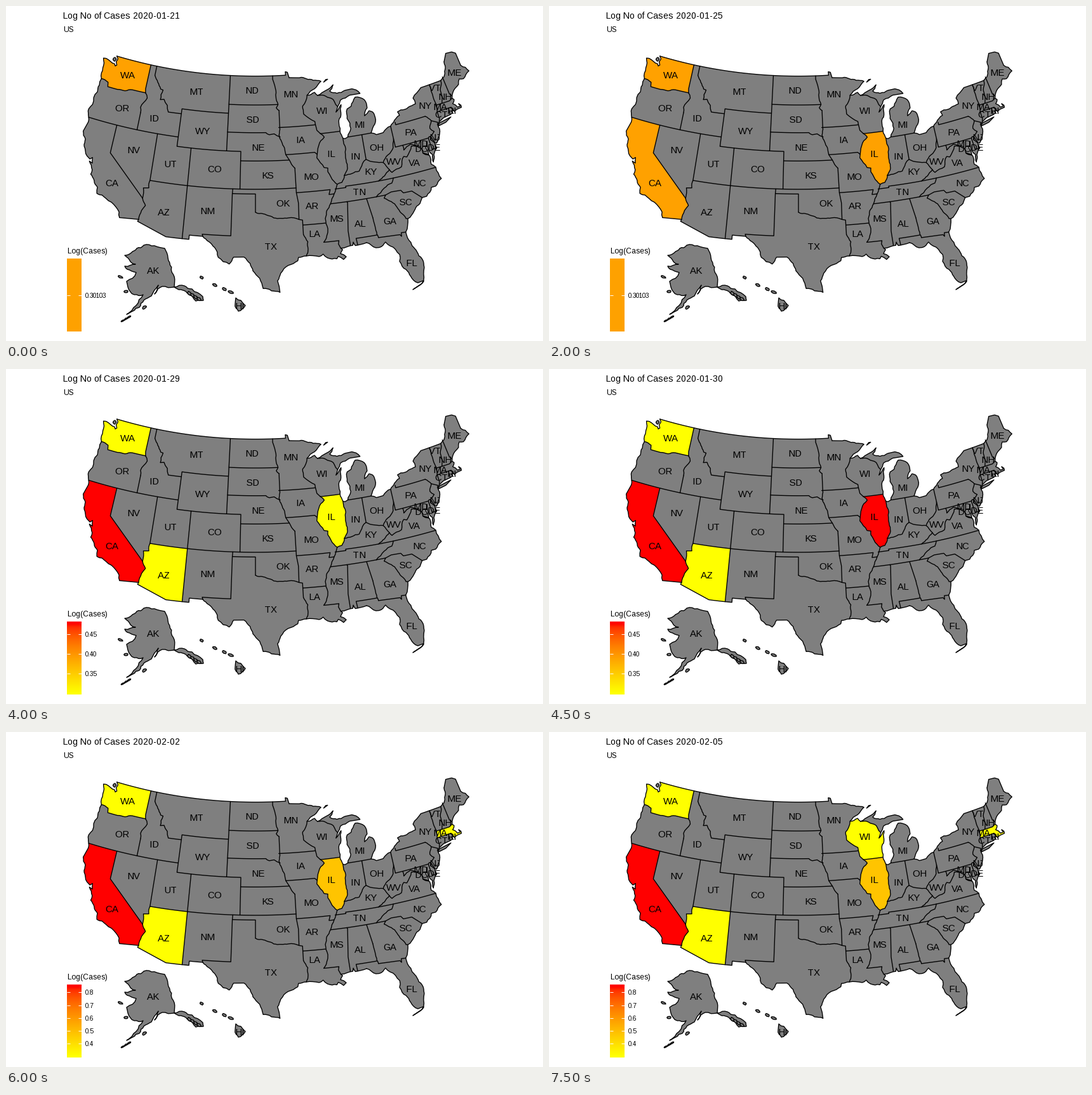
A matplotlib script for the animation above (8000 ms loop, 846 by 528 pixels).

```python
import math

import matplotlib.pyplot as plt
import numpy as np
from matplotlib.animation import FuncAnimation

W, H, DPI = 846, 528, 96
PX = 72 / DPI
DAYS, STEP_MS = 16, 500
GREY = "#7f7f7f"
plt.rcParams.update({"font.family": "Liberation Sans", "text.hinting_factor": 1})
rng = np.random.default_rng(4)

fig = plt.figure(figsize=(W / DPI, H / DPI), dpi=DPI, facecolor="white")
ax = fig.add_axes([0, 0, 1, 1])
ax.axis("off")


# ---- map geometry: key points in degrees west / north ----
def project(*c):
    """Lambert azimuthal equal-area around 45N 100W; parallels become curves."""
    p = np.array(c, float).reshape(-1, 2)
    dense = [p[:1]]
    for a, b in zip(p, p[1:]):
        n = 1 + int(2 * abs(b[0] - a[0])) if abs(b[1] - a[1]) < 0.12 else 1
        dense.append(a + (b - a) * np.arange(1, n + 1)[:, None] / n)
    lon, lat = np.radians(np.vstack(dense) * [-1, 1] + [100, 0]).T
    s = math.sqrt(0.5)
    u, v, w = np.cos(lat) * np.sin(lon), np.sin(lat), np.cos(lat) * np.cos(lon)
    k = 852 * np.sqrt(2 / (1 + s * (v + w)))
    return np.column_stack([393 + k * u, 170 - k * s * (v - w)])


def roughen(p, amount):
    """Midpoint displacement of every piece longer than a few pixels."""
    out = [p[0]]
    for a, b in zip(p, p[1:]):
        d = b - a
        if np.hypot(*d) > 5.5:
            mid = (a + b) / 2 + np.array([-d[1], d[0]]) * rng.uniform(-amount, amount)
            out.extend(roughen(np.array([a, mid, b]), amount)[1:])
        else:
            out.append(b)
    return np.array(out)


shore, borders, islands = [], [], []


def coast(*c):
    shore.append(roughen(project(*c), 0.11))
    return shore[-1]


def frontier(*c):
    shore.append(project(*c))


def river(*c):
    borders.append(roughen(project(*c), 0.09))
    return borders[-1]


def survey(*c):
    borders.append(project(*c))
    return borders[-1]


def ring(first, *parts):
    """Join arcs end to end, turning each one as needed."""
    for p in parts:
        turned = np.hypot(*(first[-1] - p[0])) > np.hypot(*(first[-1] - p[-1]))
        first = np.vstack([first, p[::-1] if turned else p])
    return first


def island(*c):
    islands.append(project(*c))


def inset(*c):
    p = np.array(c, float).reshape(-1, 2)
    islands.append(roughen(np.vstack([p, p[:1]]), 0.14))


def islet(x, y, rx, ry, tilt=0):
    a = np.linspace(0, 2 * np.pi, 9)[:-1]
    r = rng.uniform(0.75, 1.15, 8)
    u, v, t = rx * r * np.cos(a), ry * r * np.sin(a), math.radians(tilt)
    islands.append(np.column_stack([x + u * math.cos(t) - v * math.sin(t),
                                    y + u * math.sin(t) + v * math.cos(t)]))


# outer edge, counter-clockwise from the north-west
wa_coast = coast(122.76, 49, 122.45, 48.75, 122.6, 48.4, 122.35, 48.1, 122.55, 47.95,
                 122.75, 48.15, 123.15, 48.17, 124.73, 48.38, 124.35, 47.4, 124.05, 46.27)
coast(124.05, 46.27, 124.05, 44.8, 124.2, 43.4, 124.55, 42.84, 124.21, 42)
ca_coast = coast(124.21, 42, 124.07, 41.5, 124.4, 40.44, 123.8, 39.7, 123.7, 38.95, 122.98, 38.05,
                 122.5, 37.82, 122.2, 38.05, 122.05, 37.47, 122.5, 37.6, 121.85, 36.8,
                 121.9, 36.3, 120.65, 35.15, 120.55, 34.5, 119.25, 34.2, 118.5, 33.95,
                 117.3, 33.1, 117.12, 32.53)
frontier(117.12, 32.53, 114.72, 32.72, 114.81, 32.5, 111.07, 31.33, 108.21, 31.33,
         108.21, 31.78, 106.53, 31.78)
coast(106.53, 31.78, 105, 30.68, 104.5, 29.65, 103.15, 28.98, 102.65, 29.73, 101.4, 29.77,
      100.65, 29.1, 100.3, 28.3, 99.5, 27.5, 99.1, 26.4, 97.15, 25.96)
coast(97.15, 25.96, 97.4, 27.2, 97, 28, 94.9, 29.25, 94.8, 29.6, 93.85, 29.7, 92.3, 29.53,
      91.8, 29.75, 91.3, 29.3, 90.2, 29.1, 90, 29.35, 89.4, 28.95, 89.05, 29.2,
      89.7, 29.6, 89.4, 30, 89.6, 30.18, 88.1, 30.32, 88, 30.65, 87.8, 30.25, 86.4, 30.38)
coast(86.4, 30.38, 85.35, 29.68, 84.95, 29.65, 84.1, 30.1, 83.05, 29.13, 82.65, 28.5, 82.8, 27.8,
      82.2, 26.8, 81.8, 26, 81.1, 25.15, 80.4, 25.25, 80.05, 26.6, 80.55, 28.4, 81.3, 29.9,
      81.45, 30.71)
coast(81.45, 30.71, 80.87, 32.05, 79.9, 32.7, 79.2, 33.2, 78.55, 33.86, 77.95, 33.87, 77.1, 34.65,
      76.5, 34.65, 75.55, 35.25, 75.87, 36.55, 76.35, 37, 76.25, 37.9, 77.05, 38.38,
      76.32, 38.05, 76.5, 38.8, 76.1, 39.45, 76.25, 38.7, 75.85, 37.95, 76, 37.15,
      75.05, 38.45, 75.42, 39.8)
coast(75.42, 39.8, 75.55, 39.5, 74.9, 38.95, 74.1, 39.8, 74, 40.75, 73.65, 41,
      72.9, 41.25, 71.86, 41.32, 71.45, 41.4, 71.4, 41.7, 71.12, 41.5)
ma_coast = coast(71.12, 41.5, 70.65, 41.6, 70, 41.62, 69.95, 41.85, 70.2, 42.08, 70.05, 41.8,
                 70.5, 41.78, 71, 42.3, 70.6, 42.65, 70.82, 42.87)
coast(70.82, 42.87, 70.4, 43.4, 69.2, 43.95, 68.8, 44.45, 68.2, 44.3, 66.97, 44.82, 67.8, 45.7)
frontier(67.8, 45.7, 67.8, 47.07, 68.3, 47.35, 69.25, 47.45, 70, 46.7)
coast(70, 46.7, 70.3, 45.9, 70.85, 45.25, 71.5, 45.01)
frontier(71.5, 45.01, 74.7, 45)
coast(74.7, 45, 76.3, 44.2, 76.2, 43.55, 78.5, 43.37, 79.05, 43.26, 78.9, 42.85, 80.52, 41.98,
      81.75, 41.5, 82.75, 41.45, 83.45, 41.73)
coast(83.45, 41.73, 83.1, 42.2, 82.42, 43, 82.6, 43.85, 83.1, 44.07, 83.9, 43.65, 83.3, 44.4,
      83.45, 45.3, 84.75, 45.77, 85.6, 44.9, 86.25, 44.7, 86.5, 43.7, 86.2, 42.6, 86.82, 41.76,
      87.25, 41.63, 87.53, 41.71)
il_lake = coast(87.53, 41.71, 87.8, 42.49)
wi_lake = coast(87.8, 42.49, 87.75, 43.6, 87.05, 45.25, 87.98, 44.55, 87.6, 45.1)
coast(87.6, 45.1, 87, 45.75, 85.5, 46.08, 83.9, 46.05, 84.4, 46.5, 85, 46.7, 86.1, 46.67,
      87.4, 46.5, 88.45, 46.85, 87.8, 47.45, 89, 46.98, 90.42, 46.57)
wi_north = coast(90.42, 46.57, 90.8, 46.92, 92.01, 46.7)
coast(92.01, 46.7, 89.6, 48, 90.8, 48.2, 92.95, 48.62, 94.6, 48.72)
frontier(94.6, 48.72, 94.82, 49.3, 95.15, 49.37, 95.15, 49, 122.76, 49)

# western states: mostly parallels and meridians
for lat, west, east in [(42, 124.21, 111.05), (37, 114.04, 94.62), (45.94, 104.05, 96.56),
                        (40, 102.05, 95.31), (43.5, 96.6, 91.22), (33.02, 94.04, 91.17)]:
    survey(west, lat, east, lat)
for lon, south, north in [(117.03, 42, 43.85), (114.04, 37, 42), (104.05, 41, 49),
                          (109.05, 31.33, 41), (96.45, 43.5, 45.3)]:
    survey(lon, south, lon, north)
survey(104.05, 45, 111.05, 45, 111.05, 41, 102.05, 41, 102.05, 37)
survey(103, 37, 103.04, 36.5, 103.06, 32, 106.62, 32, 106.53, 31.78)
survey(103.04, 36.5, 100, 36.5, 100, 34.56)
ca_nv = survey(114.63, 35, 120, 39, 120, 42)
wa_or = river(124.05, 46.27, 122.9, 46.1, 122.75, 45.65, 121.2, 45.65, 119, 46, 116.92, 46)
wa_id = survey(116.92, 46, 117.04, 46.42, 117.03, 49)
river(116.92, 46, 116.5, 45.5, 117.2, 44.4, 117.03, 43.85)
river(116.05, 48, 114.75, 46.7, 114.35, 46.65, 114.5, 45.6, 113.95, 45.7, 113, 44.45, 111.05, 44.48)
survey(116.05, 49, 116.05, 48)
colorado = river(114.63, 35, 114.13, 34.3, 114.53, 33.7, 114.72, 32.72)
nv_az = river(114.63, 35, 114.74, 36.1, 114.04, 36.2, 114.04, 37)

# plains and the Mississippi
river(100, 34.56, 98.1, 34.13, 97.2, 33.85, 95.8, 33.87, 94.48, 33.64)
survey(104.05, 43, 98.5, 43)
river(98.5, 43, 98, 42.77, 97.3, 42.85, 96.45, 42.49)
river(97.23, 49, 96.85, 47.6, 96.56, 45.94, 96.85, 45.6, 96.45, 45.3)
river(96.45, 43.5, 96.6, 42.7, 95.9, 41.3, 95.77, 40.59, 95.31, 40, 94.62, 39.11)
survey(94.62, 39.11, 94.62, 36.5, 94.43, 35.4, 94.48, 33.64, 94.04, 33.55, 94.04, 32)
river(94.04, 32, 93.55, 31.2, 93.85, 29.7)
survey(94.62, 36.5, 90.15, 36.5, 90.37, 36, 89.7, 36)
survey(95.77, 40.59, 91.73, 40.61, 91.42, 40.38)
mn_wi = river(92.01, 46.7, 92.3, 46.1, 92.85, 45.6, 92.8, 44.75, 91.25, 43.85, 91.22, 43.5)
ia_wi = river(91.22, 43.5, 91.1, 42.9, 90.64, 42.51)
il_west = river(90.64, 42.51, 90.15, 42.1, 91.05, 41.3, 91.5, 40, 90.65, 38.9, 90.15, 38.8,
                90.2, 38.4, 89.5, 37.3, 89.15, 36.98)
river(89.15, 36.98, 89.7, 36, 90.3, 35, 91.15, 33.5, 90.95, 32.4, 91.6, 31)
survey(91.6, 31, 89.73, 31, 89.83, 30.65, 89.6, 30.18)

# lakes and Ohio valley
il_wi = survey(90.64, 42.51, 87.8, 42.49)
wi_up = river(90.42, 46.57, 88.1, 45.9, 87.85, 45.35, 87.6, 45.1)
il_in = river(87.53, 41.71, 87.53, 39.35, 87.5, 38.5, 88.05, 37.8)
il_ky = river(88.05, 37.8, 88.5, 37.1, 89.15, 36.98)
river(88.05, 37.8, 86, 38, 85.4, 38.73, 84.82, 39.1, 83.7, 38.65, 82.6, 38.42, 81.75, 39.1,
      80.85, 39.7, 80.52, 40.64)
survey(84.82, 39.1, 84.8, 41.72)
survey(86.82, 41.76, 83.45, 41.73)
survey(80.52, 41.98, 80.52, 39.72)
survey(88.2, 35, 88.1, 34.9, 88.47, 31.9, 88.4, 30.37)

# south-east
river(81.97, 37.54, 82.6, 38.42)
river(77.72, 39.32, 78.35, 39.4, 79.3, 38.42, 79.7, 38.55, 80.3, 37.55, 81.7, 37.2, 81.97, 37.54,
      83.68, 36.6)
survey(89.5, 36.5, 88.07, 36.5, 88.07, 36.65, 83.68, 36.6, 75.87, 36.55)
river(81.68, 36.59, 82, 36.1, 83.1, 35.75, 84.32, 34.99)
survey(90.3, 35, 83.1, 35, 82.3, 35.2, 81.05, 35.15, 80.78, 34.82, 79.67, 34.8, 78.55, 33.86)
river(83.1, 35, 83.35, 34.7, 81.95, 33.5, 81.1, 32.1, 80.87, 32.05)
survey(85.6, 34.98, 85.18, 32.87)
river(85.18, 32.87, 85.05, 31.5, 84.86, 30.7)
survey(84.86, 30.7, 82.2, 30.57, 82.05, 30.36, 82, 30.75, 81.45, 30.71)
survey(85, 31, 87.6, 31, 87.5, 30.28)

# north-east
survey(80.52, 39.72, 75.79, 39.72, 75.6, 39.84, 75.42, 39.8)
survey(75.79, 39.72, 75.7, 38.46, 75.05, 38.45)
river(79.48, 39.72, 79.48, 39.2, 78.4, 39.62, 77.72, 39.32, 77.05, 38.85, 77.05, 38.38)
river(75.42, 39.8, 74.75, 40.2, 75.2, 40.65, 74.7, 41.36, 75.35, 42)
survey(75.35, 42, 79.76, 42, 79.76, 42.27)
survey(74.7, 41.36, 73.9, 41, 74, 40.75)
river(73.35, 45.01, 73.4, 43.6, 73.27, 42.75)
ma_west = survey(73.27, 42.75, 73.5, 42.05)
survey(73.5, 42.05, 73.5, 41.3, 73.65, 41)
ma_north = survey(73.27, 42.75, 71.3, 42.7, 70.82, 42.87)
ma_south = survey(73.5, 42.05, 71.38, 42.02, 71.38, 41.88, 71.12, 41.5)
river(71.5, 45.01, 72.05, 44.1, 72.46, 42.73)
survey(71.08, 45.3, 70.97, 43.4, 70.7, 43.07)
survey(71.8, 42.02, 71.86, 41.32)

island(74, 40.6, 72.8, 40.72, 71.87, 41.07, 73.7, 40.88)
island(89.2, 47.87, 88.5, 48.12, 88.8, 48.12)
island(81.8, 24.55, 80.6, 25, 80.4, 25.2, 80.8, 24.9)
islet(171, 84, 2.5, 3)

# Alaska and Hawaii insets, in stage pixels
inset(265, 443, 250, 382, 217, 377, 206, 382, 187, 393, 196, 403, 204, 407, 187, 410, 191, 415,
      205, 420, 190, 434, 192, 443, 202, 455, 216, 455, 205, 472, 190, 486, 210, 475, 229, 457,
      240, 440, 234, 454, 246, 442)
inset(265, 443, 281, 441, 293, 446, 310, 458, 311, 464, 299, 465, 285, 452)
for k in range(4):
    islet(289 + 5 * k, 453 + 3 * k, 4, 2, 40)
for k in range(3):
    islet(184 + 5 * k, 496 - 3 * k, 3, 1, -30)
islet(218, 475, 4, 2, -40)
islet(180, 427, 4, 1.5, 25)
islet(189, 450, 3, 2)
for x, y, r in [(308, 428, 3), (329, 440, 4), (344, 446, 4), (354, 451, 5)]:
    islet(x, y, r, 2, 25)
inset(362, 460, 370, 464, 377, 472, 366, 481, 361, 470)

states = {
    "WA": ring(wa_coast, wa_or, wa_id),
    "CA": ring(ca_coast, colorado, ca_nv),
    "AZ": ring(colorado, project(114.81, 32.5, 111.07, 31.33, 109.05, 31.33, 109.05, 37,
                                 114.04, 37), nv_az),
    "IL": ring(il_lake[::-1], il_in, il_ky, il_west, il_wi),
    "WI": ring(wi_lake, wi_up, wi_north, mn_wi, ia_wi, il_wi),
    "MA": ring(ma_coast, ma_north, ma_west, ma_south)}

LINE = 1.35 * PX
ax.fill(*np.vstack(shore).T, fc=GREY, lw=0)
patches = {s: ax.fill(*p.T, fc=GREY, lw=0)[0] for s, p in states.items()}
for p in shore + borders:
    ax.plot(*p.T, color="black", lw=LINE, solid_joinstyle="round", solid_capstyle="round")
for p in islands:
    ax.fill(*p.T, fc=GREY, ec="black", lw=LINE, joinstyle="round")


# ---- text ----
def text(x, y, s, px, **kw):
    return ax.text(x, y, s, fontsize=px * PX, va="baseline", zorder=5, **kw)


WEST = [("WA", 191, 109), ("OR", 182, 161), ("ID", 233, 177), ("MT", 299, 135), ("ND", 387, 133),
        ("SD", 389, 178), ("WY", 309, 196), ("NE", 396, 222), ("NV", 200, 227), ("UT", 259, 249),
        ("CO", 328, 257), ("KS", 412, 266), ("CA", 166, 278), ("AZ", 248, 325), ("NM", 317, 323),
        ("OK", 436, 311), ("TX", 416, 378), ("AK", 231, 417), ("HI", 368, 472)]
MIDDLE = [("MN", 448, 138), ("WI", 498, 165), ("MI", 557, 187), ("IA", 463, 211), ("IL", 512, 233),
          ("IN", 550, 237), ("OH", 583, 223), ("MO", 480, 268), ("KY", 574, 261), ("AR", 482, 315),
          ("TN", 556, 293), ("MS", 520, 334), ("AL", 558, 343), ("LA", 485, 359)]
EAST = [("PA", 637, 198), ("WV", 610, 245), ("VA", 643, 246), ("NC", 651, 279), ("SC", 630, 309),
        ("GA", 604, 339), ("FL", 638, 404), ("NY", 659, 157), ("ME", 705, 105), ("VT", 675, 128),
        ("NH", 691, 143), ("MA", 683, 159), ("CT", 685, 171), ("RI", 702, 165), ("NJ", 675, 206),
        ("DE", 673, 222), ("MD", 653, 217), ("DC", 654, 224)]
for name, x, y in WEST + MIDDLE + EAST:
    text(x + 0.5, y + 5.5, name, 15, ha="center")

title = text(90, 20, "", 14)
text(90, 41, "US", 12)
text(96, 390, "Log(Cases)", 12)


# ---- colour scale ----
def scale_colour(t):
    """Yellow to red, blended in CIE Lab."""
    L, a, b = (1 - t) * np.array([97.14, -21.55, 94.48]) + t * np.array([53.24, 80.09, 67.2])
    fy = (L + 16) / 116
    f = np.array([fy + a / 500, fy, fy - b / 200])
    xyz = np.where(f > 6 / 29, f ** 3, (f - 4 / 29) * 108 / 841) * [0.9505, 1, 1.089]
    m = [[3.2406, -1.5372, -0.4986], [-0.9689, 1.8758, 0.0415], [0.0557, -0.204, 1.057]]
    lin = np.clip(np.array(m) @ xyz, 0, 1)
    return np.clip(np.where(lin > 0.0031308, 1.055 * lin ** (1 / 2.4) - 0.055, 12.92 * lin), 0, 1)


BINS, TOP, BOTTOM = 20, 398, 513
ramp = np.array([[scale_colour(t)] for t in np.linspace(1, 0, BINS)])
bar = ax.imshow(ramp, extent=(96, 119, BOTTOM, TOP), aspect="auto", interpolation="bilinear",
                zorder=3)
ticks = [(ax.plot([], [], color="white", lw=PX, solid_capstyle="butt", zorder=4)[0],
          text(125, 0, "", 10)) for _ in range(5)]
ax.set_xlim(0, W)
ax.set_ylim(H, 0)

# (day, state, total cases from that day on)
EVENTS = [(0, "WA", 1), (3, "IL", 1), (4, "CA", 1), (5, "CA", 2), (5, "AZ", 1), (9, "IL", 2),
          (10, "CA", 3), (11, "MA", 1), (12, "CA", 6), (15, "WI", 1)]


def update(day):
    title.set_text("Log No of Cases 2020-" +
                   (f"01-{21 + day:02d}" if day <= 10 else f"02-{day - 10:02d}"))
    values = {s: math.log10(n + 1) for d, s, n in EVENTS if d <= day}
    lo, hi = min(values.values()), max(values.values())
    span = hi - lo

    def level(v):
        return (v - lo) / span if span else 0.5

    for s, patch in patches.items():
        patch.set_facecolor(scale_colour(level(values[s])) if s in values else GREY)

    if span:
        step, digits = (0.05, 2) if span < 0.2 else (0.1, 1)
        breaks = [k * step for k in range(math.ceil(lo / step), math.floor(hi / step) + 1)]
        bar.set_data(ramp)
    else:
        breaks, digits = [lo], 5
        bar.set_data(np.tile(scale_colour(0.5), (BINS, 1, 1)))

    for i, (mark, label) in enumerate(ticks):
        on = i < len(breaks)
        mark.set_visible(on)
        label.set_visible(on)
        if on:
            y = BOTTOM + 0.5 - (level(breaks[i]) * (BINS - 1) + 0.5) / BINS * (BOTTOM - TOP)
            mark.set_data([96, 100.6, np.nan, 114.4, 119], [y] * 5)
            label.set_text(f"{breaks[i]:.{digits}f}")
            label.set_y(y + 4)
    return []


anim = FuncAnimation(fig, update, frames=DAYS, interval=STEP_MS, repeat=True)
plt.show()
```
